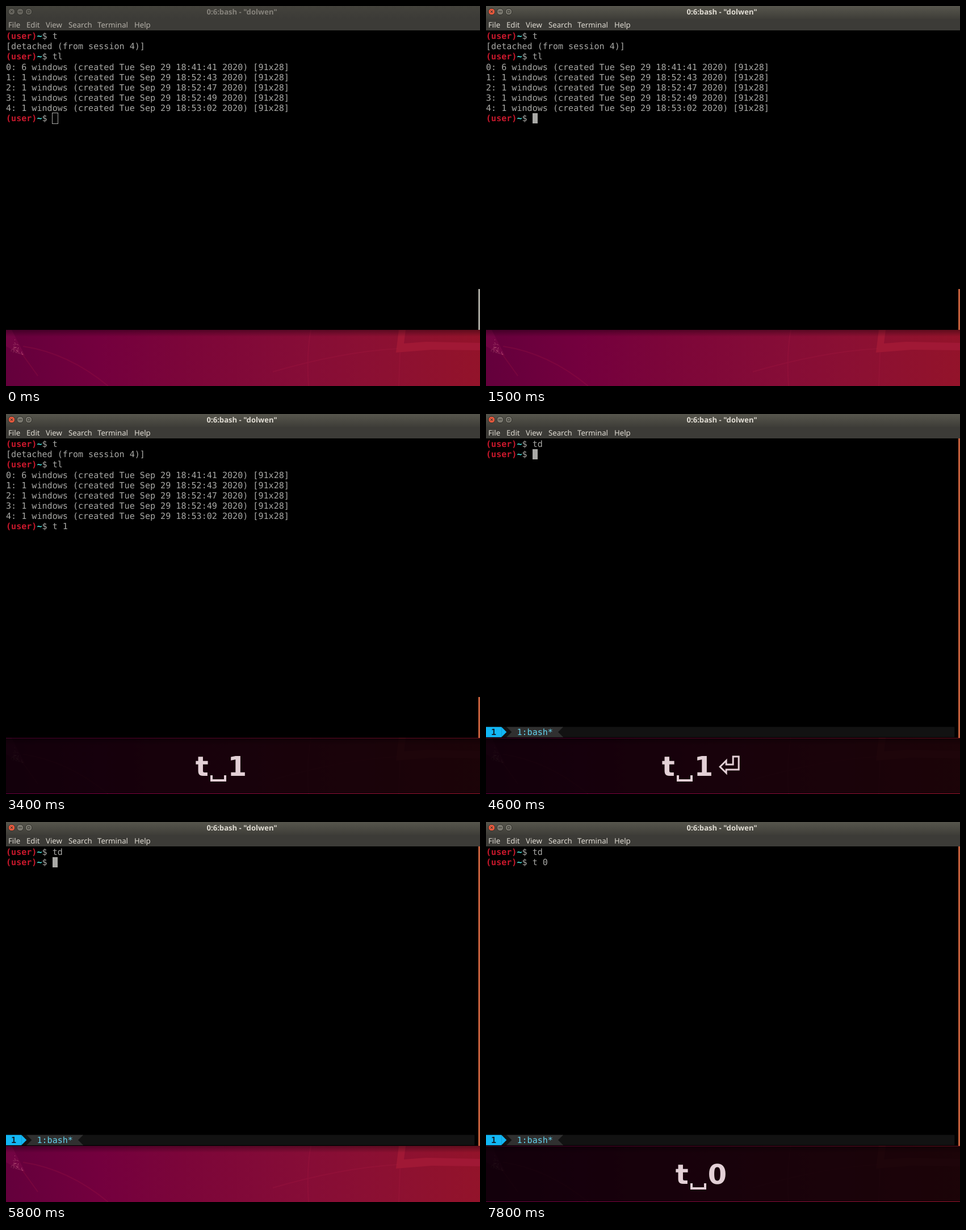
Recreate the animation shown at these times as an HTML page with a canvas. Size 835 by 670 pixels, loop 8 s.

```html
<!DOCTYPE html>
<html lang="en">
<head>
<meta charset="utf-8">
<title>Terminal session switching</title>
<style>
  html, body { margin: 0; height: 100%; overflow: hidden; background: #000; }
  canvas { display: block; }
</style>
</head>
<body>
<canvas id="stage" width="835" height="670"></canvas>
<script>
const W = 835, H = 670, LOOP = 8000;
const CELL_W = 9.07, CELL_H = 18.14, TOP = 43.8, BOTTOM = 571;
const MONO = '15.07px "DejaVu Sans Mono", monospace';
const UI = '"Noto Sans", sans-serif';
const GRAY = '#a9a9a6', RED = '#c9182c', CYAN = '#4fe3dc', KEY = '#e3d0d6';
const KEY_WIDTH = { t: 23, '␣': 34, '0': 33.4, '1': 33.4, '⏎': 48 };

const ctx = document.getElementById('stage').getContext('2d');
ctx.textRendering = 'geometricPrecision';

// Each entry changes part of the state from its time on.
const timeline = [
  [0, { focus: false, attached: false, input: '', cursor: true, keys: '', mark: false }],
  [400, { focus: true }],
  [900, { cursor: false }],
  [1500, { cursor: true }],
  [1700, { input: 't', keys: 't', mark: true }],
  [2000, { mark: false }],
  [2400, { input: 't ', keys: 't␣' }],
  [2800, { keys: 't␣1', mark: true }],
  [3000, { input: 't 1', mark: false }],
  [3400, { cursor: false }],
  [3500, { attached: true, input: '', cursor: true, keys: 't␣1⏎' }],
  [4000, { cursor: false }],
  [4600, { cursor: true }],
  [4900, { keys: '' }],
  [5200, { cursor: false }],
  [5800, { cursor: true }],
  [6100, { input: 't', keys: 't', mark: true }],
  [6300, { mark: false }],
  [6700, { input: 't ', keys: 't␣' }],
  [7100, { keys: 't␣0', mark: true }],
  [7200, { input: 't 0' }],
  [7400, { mark: false }],
  [7800, { cursor: false }],
];

const sessions = ['6 41:41', '1 52:43', '1 52:47', '1 52:49', '1 53:02'].map((s, i) => {
  const [count, time] = s.split(' ');
  const hour = '18:';
  return `${i}: ${count} windows (created Tue Sep 29 ${hour}${time} 2020) [91x28]`;
});

function rect(x, y, w, h, color) {
  ctx.fillStyle = color;
  ctx.fillRect(x, y, w, h);
}

function trace(points) {
  ctx.beginPath();
  points.forEach(([x, y]) => ctx.lineTo(x, y));
}

function poly(points, color) {
  trace(points);
  ctx.fillStyle = color;
  ctx.fill();
}

function gradient(x0, y0, x1, y1, ...colors) {
  const g = ctx.createLinearGradient(x0, y0, x1, y1);
  colors.forEach((c, i) => g.addColorStop(i / (colors.length - 1), c));
  return g;
}

function label(text, x, y, font, color, align = 'left') {
  ctx.font = font;
  ctx.fillStyle = color;
  ctx.textAlign = align;
  ctx.fillText(text, x, y);
}

function cells(text, col, row, color = GRAY, weight = '') {
  [...text].forEach((ch, i) =>
    label(ch, (col + i) * CELL_W, TOP + row * CELL_H + 14.3, `${weight} ${MONO}`, color));
}

function prompt(row, command) {
  cells('(user)', 0, row, RED, 'bold');
  cells('~', 6, row, CYAN, 'bold');
  cells('$ ' + command, 7, row);
}

function drawWallpaper() {
  rect(0, BOTTOM, W, H - BOTTOM, gradient(0, 640, W, 600, '#64003c', '#74003e', '#7d0639', '#850c37', '#8c1032', '#93132a'));

  poly([[0, 571], [10, 571], [34, 617], [26, 614], [0, 600]], 'rgba(160,20,90,.22)');
  poly([[692, 571], [704, 571], [701, 595], [740, 592], [835, 594], [835, 607], [750, 606], [687, 611]], '#a01835');

  ctx.strokeStyle = 'rgba(175,30,70,.22)';
  ctx.lineWidth = 2;
  ctx.beginPath();
  ctx.moveTo(537, 571); ctx.quadraticCurveTo(529, 615, 533, 670);
  ctx.moveTo(470, 645); ctx.quadraticCurveTo(590, 610, 690, 604);
  ctx.moveTo(694, 611); ctx.lineTo(692, 670);
  ctx.moveTo(28, 613); ctx.lineTo(56, 652);
  ctx.moveTo(30, 600); ctx.quadraticCurveTo(110, 612, 180, 670);
  ctx.stroke();

  let seed = 7;
  const random = () => (seed = seed * 16807 % 2147483647) / 2147483647;
  for (let i = 0; i < 50; i++) {
    const down = Math.sqrt(random());
    const x = 15 - 8 * down + random() * 25 * down;
    rect(x, 588 + 28 * down - 8 * (1 - (x - 7) / 25) * down, 1, 1, 'rgba(220,130,150,.6)');
  }
  rect(0, BOTTOM, W, 12, gradient(0, BOTTOM, 0, BOTTOM + 12, 'rgba(0,0,0,.35)', 'rgba(0,0,0,0)'));
}

function drawButton(x, fill, icon) {
  ctx.beginPath();
  ctx.arc(x, 10, 5.8, 0, 7);
  ctx.fillStyle = fill;
  ctx.fill();
  ctx.strokeStyle = '#30302b';
  ctx.lineWidth = 1;
  ctx.stroke();
  ctx.stroke(new Path2D(`M${x} 10${icon}`));
}

function drawWindowBars(focus) {
  rect(0, 0, W, 43, '#3c3b37');
  rect(0, 0, W, 23, focus ? gradient(0, 0, 0, 23, '#57564d', '#3e3d38') : gradient(0, 0, 0, 23, '#43423c', '#3c3b37'));
  const plain = focus ? '#7a786f' : '#66645d';
  drawButton(10, focus ? '#e4583c' : plain, 'm-2-2l4 4m0-4l-4 4');
  drawButton(25, plain, 'm-3 0h6');
  drawButton(40, plain, 'm-2-2h4v4h-4z');
  label('0:6:bash - "dolwen"', 415.5, 14.5, `bold 13.1px ${UI}`, focus ? '#dfdbd2' : '#85827b', 'center');
  const menu = { File: 4, Edit: 36, View: 70, Search: 110, Terminal: 161, Help: 226 };
  for (const name in menu)
    label(name, menu[name], 37.7, `13.2px ${UI}`, focus ? '#dfdbd2' : '#b4b0a8');
}

function drawStatusBar() {
  const y = TOP + 28 * CELL_H, mid = y + CELL_H / 2, end = y + CELL_H;
  const x = col => col * CELL_W;
  const arrow = (from, to, color) => poly([[x(from), y], [x(to), mid], [x(from), end]], color);
  rect(0, y, x(91), CELL_H, '#121212');
  rect(0, y, x(3), CELL_H, '#12b7f5');
  arrow(3, 4, '#12b7f5');
  rect(x(4), y, x(11), CELL_H, '#303030');
  arrow(4, 5, '#121212');
  arrow(15, 14, '#121212');
  cells('1', 1, 28, '#10202c', 'bold');
  cells('1:bash*', 6, 28, '#63d3ee');
}

function drawTerminal({ focus, attached, input, cursor }) {
  rect(0, 43, W, BOTTOM - 43, '#000');
  let row;
  if (attached) {
    prompt(0, 'td');
    drawStatusBar();
    row = 1;
  } else {
    prompt(0, 't');
    cells('[detached (from session 4)]', 0, 1);
    prompt(2, 'tl');
    sessions.forEach((line, i) => cells(line, 0, 3 + i));
    row = 8;
  }
  prompt(row, input);

  const x = Math.round((9 + input.length) * CELL_W), y = Math.round(TOP + row * CELL_H);
  if (cursor && focus) rect(x, y, 9, 18, GRAY);
  if (cursor && !focus) {
    ctx.strokeStyle = GRAY;
    ctx.lineWidth = 1;
    ctx.strokeRect(x - .5, y - .5, 10, 19);
  }
  const thumb = attached ? 43 : 499;
  rect(832, thumb, 3, BOTTOM - thumb, focus ? '#c4603c' : '#a5a49d');
}

function drawKeys(keys, mark) {
  rect(0, 572, W, 97, 'rgba(0,0,0,.81)');
  const all = [...keys];
  let x = 379 - all.reduce((sum, k) => sum + KEY_WIDTH[k], 0) / 2;
  all.forEach((key, i) => {
    const width = KEY_WIDTH[key];
    ctx.strokeStyle = KEY;
    if (key === '␣') {
      trace([[x + 5.2, 637], [x + 5.2, 646], [x + 29.2, 646], [x + 29.2, 637]]);
      ctx.lineWidth = 4;
      ctx.stroke();
    } else if (key === '⏎') {
      trace([[12, 622], [23, 611], [23, 618], [35, 618], [35, 604], [45, 604], [45, 627], [23, 627], [23, 633]]
        .map(([dx, y]) => [x + dx, y]));
      ctx.closePath();
      ctx.lineWidth = 3;
      ctx.stroke();
    } else {
      label(key, x, 638, 'bold 48px "DejaVu Sans", sans-serif', KEY);
      if (mark && i === all.length - 1) rect(Math.round(x), 640, Math.round(width), 3, KEY);
    }
    x += width;
  });
}

function draw(now) {
  const time = now % LOOP;
  const state = Object.assign({}, ...timeline.filter(([at]) => at <= time).map(([, change]) => change));
  drawWallpaper();
  drawWindowBars(state.focus);
  drawTerminal(state);
  if (state.keys) drawKeys(state.keys, state.mark);
}

const start = performance.now();
function tick() {
  draw(performance.now() - start);
  requestAnimationFrame(tick);
}
tick();
</script>
</body>
</html>
```
